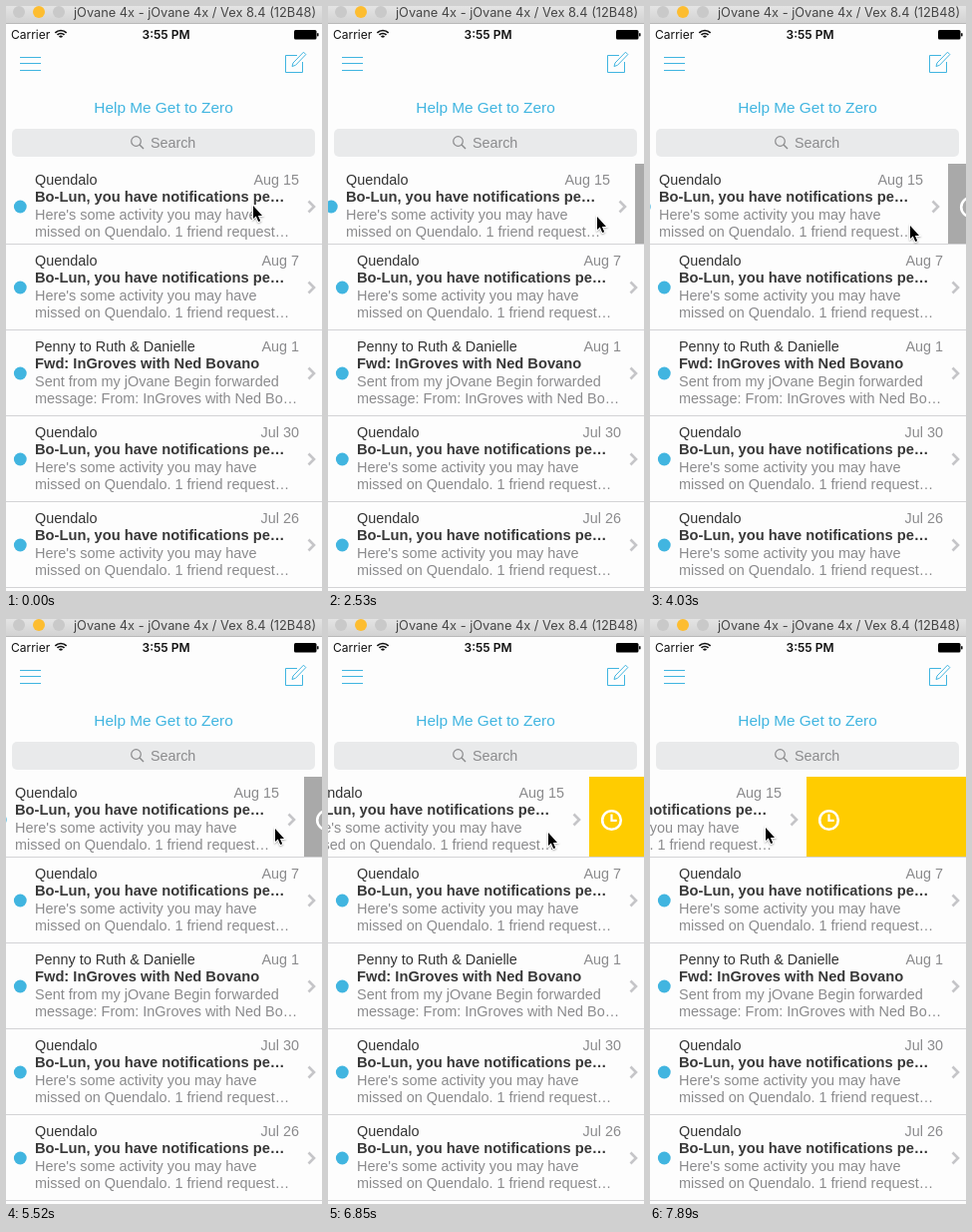
These frames come from a looping animation (317 px wide and 586 px high, 8000 ms). An HTML page with a canvas:

```html
<!DOCTYPE html>
<html lang="en">
<head>
<meta charset="utf-8">
<title>Inbox swipe</title>
<style>
html, body { margin: 0; width: 317px; height: 586px; overflow: hidden; background: #fff; }
canvas { display: block; }
</style>
</head>
<body>
<canvas id="stage" width="317" height="586"></canvas>
<script>
const ctx = document.getElementById('stage').getContext('2d');
const LOOP = 8000;
const STEP = 145;
const WIDTH = 317;
const ROW_RIGHT = 319;
const ROW_HEIGHT = 86;
const SNOOZE_AT = -45;
const SANS = '"Liberation Sans", Arial, sans-serif';
const UI = 'Inter, Roboto, sans-serif';
const BLUE = '#41b5e0';
const GREY = '#8b8b8d';

const activity = date => ({
  from: 'Quendalo', date,
  subject: 'Bo-Lun, you have notifications pe…',
  body: ["Here's some activity you may have", 'missed on Quendalo. 1 friend request…']
});
const mails = [
  activity('Aug 15'),
  activity('Aug 7'),
  {
    from: 'Penny to Ruth & Danielle', date: 'Aug 1',
    subject: 'Fwd: InGroves with Ned Bovano',
    body: ['Sent from my jOvane Begin forwarded', 'message: From: InGroves with Ned Bo…']
  },
  activity('Jul 30'),
  activity('Jul 26')
];

// Pointer moves: start time, number of steps, where to, easing power
const home = { x: 248, y: 200 };
const firstDrag = 2230;
const secondDrag = 5220;
const moves = [
  { at: 600, steps: 4, x: 271, y: 206 },
  { at: 1490, steps: 3, x: 290, y: 207 },
  { at: firstDrag, steps: 5, x: 231, y: 218, power: 2.1 },
  { at: 3280, steps: 1, x: 230, y: 219 },
  { at: 3580, steps: 4, x: 261, y: 220 },
  { at: secondDrag, steps: 3, x: 270, y: 210 },
  { at: 5970, steps: 3, x: 240, y: 211, power: 2 },
  { at: 6410, steps: 4, x: 221, y: 214 },
  { at: 7000, steps: 3, x: 184, y: 220, power: 0.5 },
  { at: 7590, steps: 3, x: 116, y: 209, power: 0.8 }
];

function pointerAt(t) {
  const i = moves.findLastIndex(m => m.at <= t);
  if (i < 0) return home;
  const from = moves[i - 1] || home;
  const { at, steps, x, y, power = 1 } = moves[i];
  const done = Math.min(steps, Math.floor((t - at) / STEP) + 1);
  const p = (done / steps) ** power;
  return {
    x: Math.round(from.x + (x - from.x) * p),
    y: Math.round(from.y + (y - from.y) * p)
  };
}

// Both drags follow the pointer once it has passed a small threshold.
function rowOffset(t, x) {
  if (t < firstDrag) return 0;
  return t < secondDrag ? Math.min(0, x - 281) : Math.min(-20, x - 278);
}

function text(str, x, y, font, color, align = 'left') {
  ctx.font = font;
  ctx.fillStyle = color;
  ctx.textAlign = align;
  ctx.fillText(str, x, y);
}

function rect(x, y, w, h, color) {
  ctx.fillStyle = color;
  ctx.fillRect(x, y, w, h);
}

function roundRect(x, y, w, h, r, color) {
  ctx.fillStyle = color;
  ctx.beginPath();
  ctx.roundRect(x, y, w, h, r);
  ctx.fill();
}

function disc(x, y, r, color) {
  ctx.fillStyle = color;
  ctx.beginPath();
  ctx.arc(x, y, r, 0, Math.PI * 2);
  ctx.fill();
}

function arc(x, y, r, color, width, from = 0, to = Math.PI * 2) {
  ctx.strokeStyle = color;
  ctx.lineWidth = width;
  ctx.beginPath();
  ctx.arc(x, y, r, from, to);
  ctx.stroke();
}

function line(points, color, width, closed) {
  ctx.strokeStyle = color;
  ctx.lineWidth = width;
  ctx.beginPath();
  points.forEach(([x, y]) => ctx.lineTo(x, y));
  if (closed) ctx.closePath();
  ctx.stroke();
}

function drawTitleBar() {
  const shade = ctx.createLinearGradient(0, 0, 0, 17);
  shade.addColorStop(0, '#e4e4e4');
  shade.addColorStop(1, '#d2d2d2');
  rect(0, 0, WIDTH, 17, shade);
  rect(0, 17, WIDTH, 1, '#b9b9b9');
  ['#c9c9c9', '#fdbd30', '#c9c9c9'].forEach((color, i) => disc(13 + i * 20, 6, 6, color));
  text('jOvane 4x - jOvane 4x / Vex 8.4 (12B48)', 68, 11, `12.8px ${UI}`, '#454545');
}

function drawStatusBar() {
  text('Carrier', 5, 33, `12px ${UI}`, '#111');
  text('3:55 PM', 160.5, 33, `600 12px ${UI}`, '#111', 'center');
  for (let r = 2; r < 9; r += 3) arc(55, 32.5, r, '#111', 1.7, -Math.PI * 0.75, -Math.PI * 0.25);
  roundRect(289, 24, 22.5, 9.5, 1.5, '#000');
  roundRect(312, 27, 1.6, 3.6, 0.8, '#111');
}

function drawHeader() {
  for (let i = 0; i < 3; i++) rect(14, Math.floor(51 + i * 6.5), 21, 1, BLUE);

  line([[292, 49.5], [280.5, 49.5], [280.5, 66.5], [297.5, 66.5], [297.5, 56]], BLUE, 1);
  line([[287, 60.5], [288, 57], [298.5, 46.2], [300.8, 48.6], [290.5, 59.3]], BLUE, 1, true);

  text('Help Me Get to Zero', 158, 107, `15.4px ${SANS}`, BLUE, 'center');

  roundRect(6, 123, 304, 28, 5, '#e9eaeb');
  arc(130.5, 135.5, 4.8, GREY, 1.2);
  line([[134, 139], [138, 143]], GREY, 1.4);
  text('Search', 145, 142, `14.3px ${SANS}`, GREY);
}

function drawMail(mail, top, dx) {
  ctx.save();
  ctx.translate(dx, top);
  disc(14.3, 43, 6.4, BLUE);
  text(mail.from, 29, 21, `14.4px ${SANS}`, '#333');
  text(mail.date, 294, 21, `14.4px ${SANS}`, GREY, 'right');
  text(mail.subject, 29, 38, `bold 14.7px ${SANS}`, '#383838');
  mail.body.forEach((str, i) => text(str, 29, 56 + i * 17, `14.45px ${SANS}`, GREY));
  line([[303.5, 37.5], [309, 43], [303.5, 48.5]], '#c5c5c8', 2.6);
  ctx.restore();
}

function drawAction(dx) {
  const left = ROW_RIGHT + dx;
  const x = left + 22.5;
  rect(left, 158, WIDTH - left, 80, dx < SNOOZE_AT ? '#ffcc00' : '#a9a9a9');
  arc(x, 201.5, 9.3, '#fff', 2.6);
  line([[x, 195.5], [x, 201.8], [x + 5.2, 201.8]], '#fff', 2.2);
}

const arrow = new Path2D('M0 0V13L2.8 10.4L5.2 16L7.2 15.2L4.9 9.9H9Z');

function drawPointer({ x, y }) {
  ctx.save();
  ctx.translate(x, y);
  ctx.strokeStyle = '#fff';
  ctx.lineWidth = 2;
  ctx.shadowColor = 'rgba(0,0,0,0.3)';
  ctx.shadowBlur = 2;
  ctx.shadowOffsetY = 1;
  ctx.stroke(arrow);
  ctx.shadowColor = 'transparent';
  ctx.fillStyle = '#000';
  ctx.fill(arrow);
  ctx.restore();
}

function draw(t) {
  const pointer = pointerAt(t);
  const dx = rowOffset(t, pointer.x);

  rect(0, 0, WIDTH, 586, '#fdfdfd');
  drawTitleBar();
  drawStatusBar();
  drawHeader();

  mails.forEach((mail, i) => {
    const bottom = 238 + i * ROW_HEIGHT;
    drawMail(mail, i ? bottom - ROW_HEIGHT + 1 : 158, i ? 0 : dx);
    rect(0, bottom, WIDTH, 1, '#d3d3d5');
  });
  if (dx < 0) drawAction(dx);
  drawPointer(pointer);
}

const start = performance.now();
function tick() {
  draw((performance.now() - start) % LOOP);
  requestAnimationFrame(tick);
}
tick();
</script>
</body>
</html>
```
